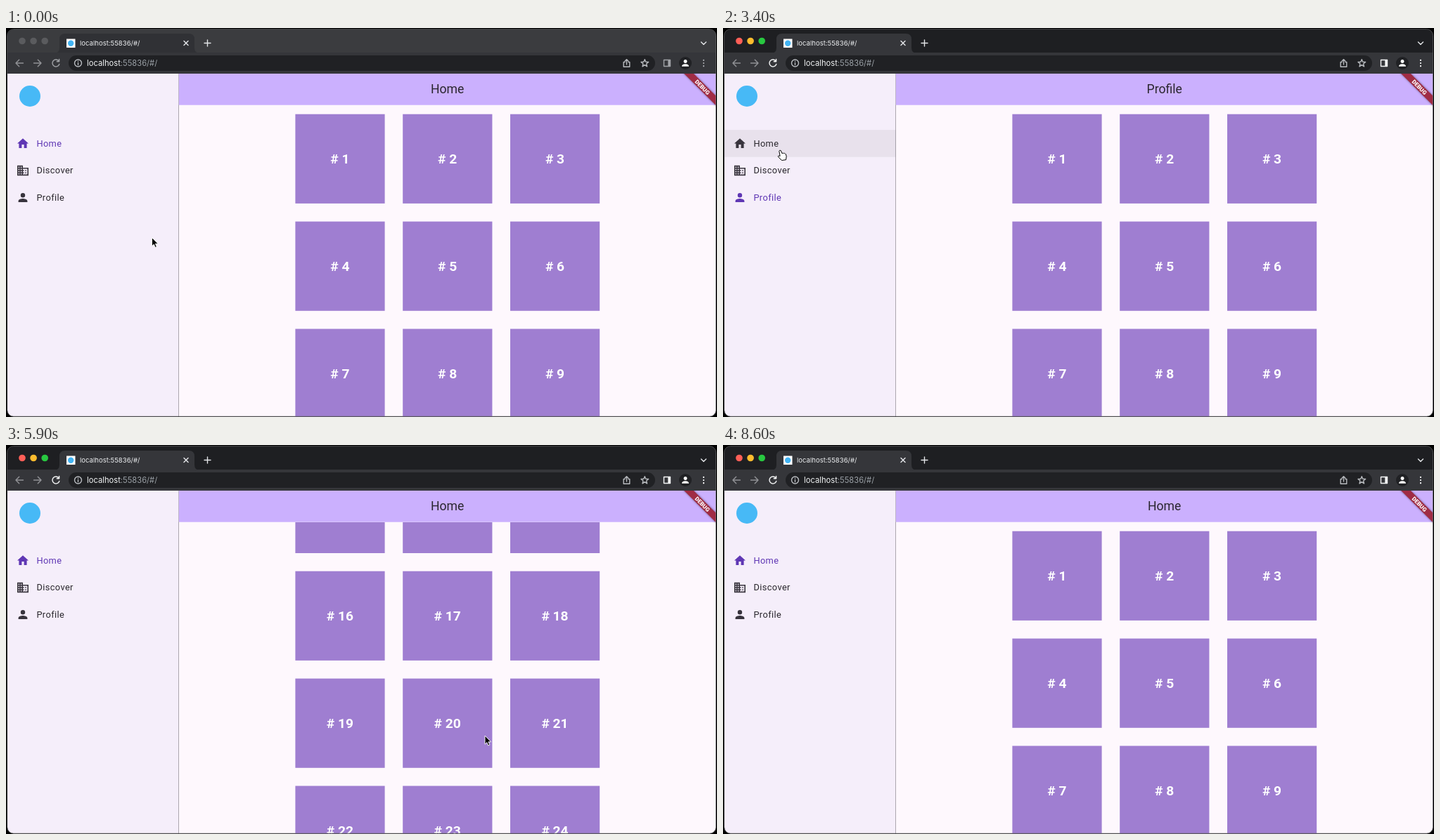
Write an HTML page that moves like this. It is 1011x554 px and loops after 9.3 s.

```html
<!DOCTYPE html>
<html lang="en">
<head>
<meta charset="utf-8">
<title>Sidebar navigation</title>
<style>
html, body { margin: 0; width: 100%; height: 100%; overflow: hidden; background: #000; }
svg { display: block; width: 1011px; height: 554px; }
.ui { font-family: Inter, sans-serif; }
.app { font-family: Roboto, sans-serif; }
.line { fill: none; stroke-width: 1.4; stroke-linecap: round; stroke-linejoin: round; }
</style>
</head>
<body>
<svg viewBox="0 0 1011 554">
  <defs>
    <clipPath id="window"><rect x="2" y="2" width="1007.5" height="551.3" rx="9"/></clipPath>
    <clipPath id="body"><rect x="246" y="110" width="764" height="444"/></clipPath>
    <clipPath id="page"><rect x="246" y="65" width="764" height="489"/></clipPath>
    <filter id="soft" x="-50%" y="-50%" width="200%" height="200%"><feGaussianBlur stdDeviation="1.8"/></filter>
  </defs>
  <rect width="1011" height="554" fill="#000"/>
  <g clip-path="url(#window)">
    <rect id="strip" width="1011" height="40"/>
    <path id="tab" d="M68 36Q76 36 76 28V16Q76 8 84 8H260Q268 8 268 16V28Q268 36 276 36Z"/>
    <rect y="35" width="1011" height="30.5" fill="#35363a"/>
    <g id="lights"></g>
    <rect x="86" y="15.5" width="12.5" height="12.5" fill="#fff"/>
    <circle cx="92.2" cy="21.8" r="4.2" fill="#42b4f4"/>
    <g class="ui">
      <text x="105" y="25" font-size="9.55" fill="#eceef0">localhost:55836/#/</text>
      <rect x="89" y="39" width="834" height="22" rx="11" fill="#202124"/>
      <text x="115" y="53.8" font-size="11.2" fill="#9aa0a6"><tspan fill="#f1f3f4">localhost</tspan>:55836/#/</text>
    </g>
    <path class="line" stroke="#e3e5e8" d="M253 18.5l6 6m0-6l-6 6M282 21.5h9m-4.5-4.5v9M988.5 20l3.5 3.5 3.5-3.5"/>
    <path class="line" stroke="#909195" d="M24.5 50H14m4.7-4.8L14 50l4.7 4.8M39.5 50H50m-4.7-4.8L50 50l-4.7 4.8"/>
    <g id="pill" class="line" stroke="#b9bcc0">
      <circle cx="102.5" cy="50" r="5"/>
      <path d="M102.5 49.5v3m0-5.2v.1M880 48.5h-1.8v6.7h8.6v-6.7H885M882.5 52v-7.2m-2.3 2.2l2.3-2.3 2.3 2.3"/>
    </g>
    <g id="tools" class="line">
      <path d="M75 47a5 5 0 1 0 .8 4.5M75.6 44.5v3.3h-3.3M935.5 45.5h9v9h-9zM942 45.5v9m1.3 0v-9"/>
      <path d="M992 45.8v.1m0 4.1v.1m0 4.1v.1" stroke-width="2.2"/>
    </g>
    <circle cx="966" cy="50" r="9" fill="#202124"/>
    <path d="M961 54.8q0-3.6 5-3.6t5 3.6zM966 50.1a2.5 2.5 0 1 1 .1 0z" fill="#fff"/>

    <g class="app">
      <rect x="246" y="65" width="764" height="489" fill="#fef8fd"/>
      <g clip-path="url(#body)"><g id="grid"></g></g>
      <rect x="245.7" y="65" width="764" height="44.7" fill="#cbb0fe"/>
      <text id="title" x="627.7" y="93.2" font-size="17.6" text-anchor="middle" fill="#2b2730"></text>
      <g clip-path="url(#page)"><g transform="translate(1009.5 65) rotate(45)">
        <rect x="-34" y="22.4" width="68" height="9.6" filter="url(#soft)" opacity=".5"/>
        <rect x="-34" y="22.4" width="68" height="9.6" fill="#a02c45"/>
        <text y="30.2" font-size="8.2" font-weight="900" text-anchor="middle" fill="#fff">DEBUG</text>
      </g></g>
      <rect y="65" width="245.7" height="489" fill="#f5eefa"/>
      <circle cx="34" cy="97" r="15" fill="#47b9f6"/>
      <g id="menu"></g>
    </g>
  </g>
  <rect x="1.7" y="1.7" width="1007.8" height="551.5" rx="9" fill="none" stroke="#606163" stroke-width=".8"/>
  <path id="arrow" d="M0 0V12.2L2.8 9.6 4.7 14 6.8 13.1 4.9 8.8H8.7Z" stroke="#fff" stroke-width=".9"/>
  <path id="hand" d="M-1.7 1.7Q-1-.2.9 1.2L2.5 5.2Q4 4 5 5.1 6.2 4.4 6.8 5.3 8 5.4 8.7 9.4L8 14.2 2 15-2.7 10.3Q-4.2 7.8-.4 8.9Z" fill="#fff" stroke="#000" stroke-linejoin="round"/>
</svg>
<script>
const LOOP = 9300, STEP = 100;
const FOCUS = 1100, LEAVE = 8600;   // window gets focus, pointer leaves
const ROW_TOP = 145.2, ROW = 38.5;
const $ = id => document.getElementById(id);

function set(el, attrs) {
  for (const k in attrs) el.setAttribute(k, attrs[k]);
  return el;
}

function add(parent, tag, attrs, text = '') {
  const el = set(document.createElementNS('http://www.w3.org/2000/svg', tag), attrs);
  el.textContent = text;
  return parent.appendChild(el);
}

const clamp = x => Math.min(1, Math.max(0, x));
const smooth = x => x * x * (3 - 2 * x);
const easeOut = x => 1 - (1 - x) ** 3;
const square = (x, y) => `M${x} ${y}h2v2h-2z`;

function building() {
  let d = 'M2 3H12V7H22V21H2zM14 9V19H20V9z' + square(16, 11) + square(16, 15);
  for (let x = 4; x <= 12; x += 4)
    for (let y = x < 12 ? 5 : 9; y < 20; y += 4) d += square(x, y);
  return d;
}

const items = [
  { name: 'Home', click: 3700, icon: 'M10 20v-6h4v6h5v-8h3L12 3 2 12h3v8z' },
  { name: 'Discover', click: 1700, icon: building() },
  { name: 'Profile', click: 2600, icon: 'M12 12a4 4 0 1 0 0-8 4 4 0 0 0 0 8zM4 18c0-2.7 5.3-4 8-4s8 1.3 8 4v2H4z' }
];

items.forEach((item, i) => {
  const y = ROW_TOP + i * ROW;
  item.hover = add($('menu'), 'rect', { y, width: 245.7, height: ROW, fill: '#1b1d1b' });
  item.mark = add($('menu'), 'path', { d: item.icon, 'fill-rule': 'evenodd', transform: `translate(14.4 ${y + 9.7}) scale(.8)` });
  item.label = add($('menu'), 'text', { x: 43.4, y: y + 23.3, 'font-size': 12.8, 'letter-spacing': .4 }, item.name);
});

for (let n = 0; n < 30; n++) {
  const x = 411.4 + n % 3 * 152.8, y = 122.7 + Math.floor(n / 3) * 152.9;
  add($('grid'), 'rect', { x, y, width: 127.2, height: 127.2, fill: '#9f7ed1' });
  add($('grid'), 'text', { x: x + 63.5, y: y + 70.2, 'font-size': 19.2, 'font-weight': 700, 'text-anchor': 'middle', fill: '#fff' }, '# ' + (n + 1));
}

const lights = ['#fe5f57', '#febc2e', '#28c840'];
lights.forEach((c, i) => add($('lights'), 'circle', { cx: 23 + i * 16.1, cy: 18.5, r: 4.8 }));

let star = '';
for (let i = 0; i < 10; i++) {
  const r = i % 2 ? 2.4 : 5.6, a = i * Math.PI / 5;
  star += `${i ? 'L' : 'M'}${908.3 + r * Math.sin(a)} ${50.3 - r * Math.cos(a)}`;
}
add($('pill'), 'path', { d: star + 'Z' });

// Pointer trips: start, length, then where it arrives
const trips = [
  [0, 1100, 82, 203],
  [1900, 400, 86, 240],
  [2700, 350, 81.5, 173.5],
  [4300, 200, 322, 277.5],
  [4550, 650, 681, 414],
  [6900, 200, 679, 418],
  [8000, 600, 785, 0]
];

function pointer(t) {
  return trips.reduce(([px, py], [start, length, x, y]) => {
    const p = smooth(clamp((t - start) / length));
    return [px + (x - px) * p, py + (y - py) * p];
  }, [207.5, 298.5]);
}

// Scroll flicks: start, length, distance
const flicks = [[4800, 400, 430], [5300, 200, 277.5], [5900, 300, -200], [6400, 200, -260], [6900, 250, -247.5]];

function scrolled(t) {
  return flicks.reduce((sum, [start, length, way]) => sum + way * easeOut(clamp((t - start) / length)), 0);
}

// Index of the menu row below the pointer, or -1
function rowAt(t) {
  const [x, y] = pointer(t), i = Math.floor((y - ROW_TOP) / ROW);
  return t >= FOCUS && x < 246 && i < items.length ? i : -1;
}

// Row highlight lags behind the pointer
function glow(i, t) {
  const samples = 30;
  let hits = 0;
  for (let k = 0; k < samples; k++) if (rowAt(t - k * 10) === i) hits++;
  return clamp(2 * hits / samples);
}

function selected(t) {
  const past = items.filter(item => item.click <= t).sort((a, b) => b.click - a.click);
  return past[0] || items[0];
}

function draw(t) {
  const active = t >= FOCUS;
  set($('strip'), { fill: active ? '#1e1f22' : '#3b3c3f' });
  set($('tab'), { fill: active ? '#35363a' : '#303135' });
  set($('tools'), { stroke: active ? '#f4f5f6' : '#a0a2a6' });
  lights.forEach((c, i) => set($('lights').children[i], { fill: active ? c : '#5a5b5e' }));

  const current = selected(t);
  $('title').textContent = current.name;
  set($('grid'), { transform: `translate(0 ${-scrolled(t)})` });

  items.forEach((item, i) => {
    const on = item === current;
    set(item.hover, { opacity: .06 * glow(i, t) });
    set(item.mark, { fill: on ? '#5f37b4' : '#38343d' });
    set(item.label, { fill: on ? '#5f37b4' : '#2a272d' });
  });

  const [x, y] = pointer(t), link = rowAt(t) >= 0;
  const place = (id, shown) => set($(id), {
    transform: `translate(${x} ${y})`,
    visibility: shown && t < LEAVE ? 'visible' : 'hidden'
  });
  place('arrow', !link);
  place('hand', link);
}

const begin = performance.now();
function tick() {
  const t = Math.max(0, performance.now() - begin) % LOOP;
  draw(Math.floor(t / STEP) * STEP);
  requestAnimationFrame(tick);
}
tick();
</script>
</body>
</html>
```
